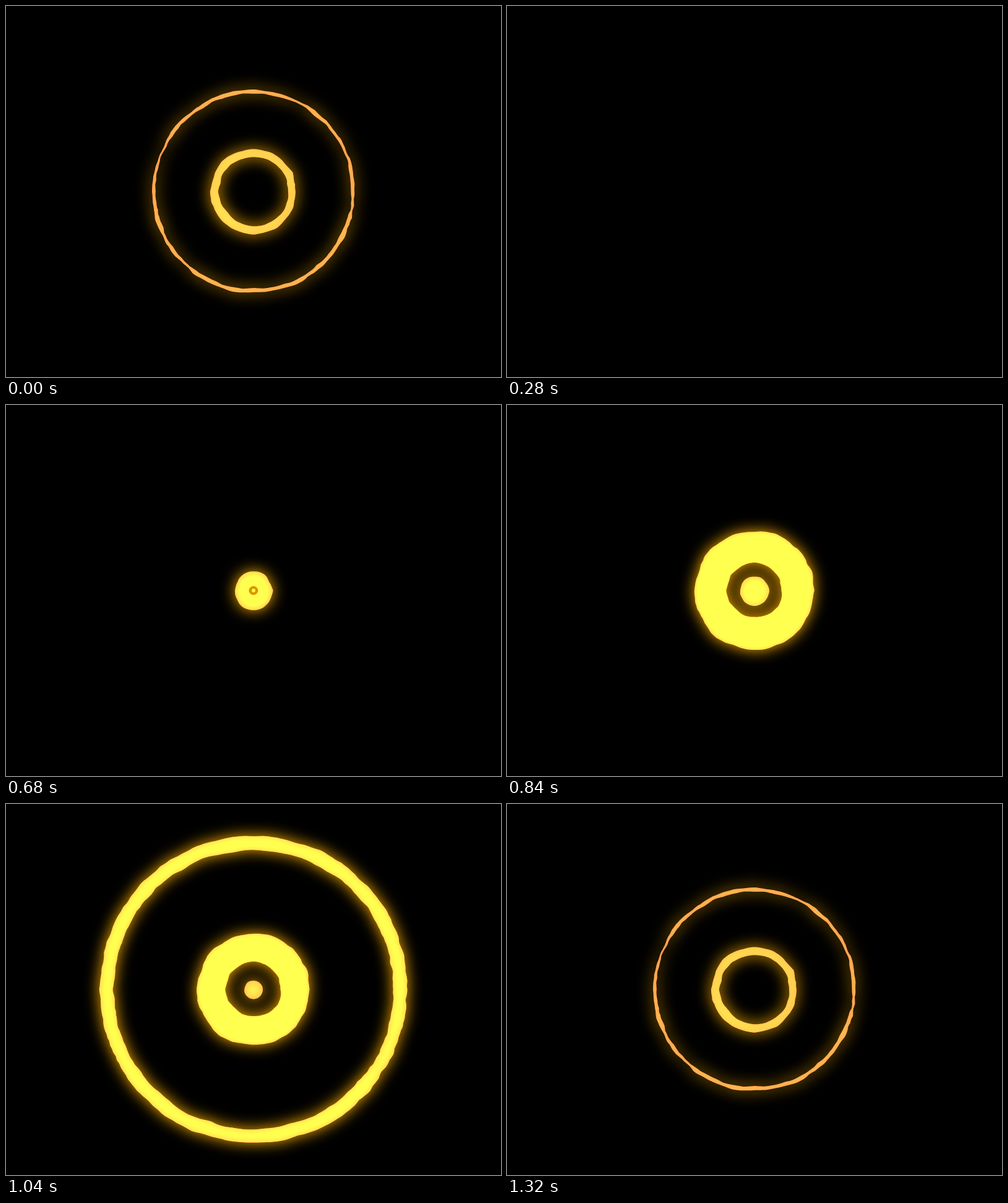
An HTML page for the animation above (1360 ms loop, 800 by 600 pixels).

```html
<!DOCTYPE html>
<html lang="en">
<head>
<meta charset="utf-8">
<title>Glowing rings</title>
<style>
  html, body { margin: 0; width: 100%; height: 100%; overflow: hidden; background: #000; }
  svg { display: block; width: 100vw; height: 100vh; background: #000; }
</style>
</head>
<body>
<svg viewBox="0 0 800 600">
  <defs>
    <filter id="glow" filterUnits="userSpaceOnUse" x="0" y="0" width="800" height="600" color-interpolation-filters="sRGB">
      <feGaussianBlur in="SourceAlpha" stdDeviation="12" result="blur"/>
      <feColorMatrix in="blur" values="0 0 0 0 1  0 0 0 0 .7  0 0 0 0 0  0 0 0 1 0" result="halo"/>
      <feComposite in="SourceGraphic" in2="halo" operator="arithmetic" k1="0" k2="1" k3="1" k4="0"/>
    </filter>
  </defs>
  <rect width="800" height="600" fill="#000"/>
  <g id="rings" filter="url(#glow)" fill="#ff8e50" fill-rule="evenodd"></g>
</svg>
<script>
const STEP = 40, LOOP = 1360, SPAN = 1320, FIRST = 520;
const CX = 400, CY = 300;

// Each ring grows to its own size; stroke scales the band width.
const rings = [
  { start: 520, size: 262, stroke: 1 },
  { start: 680, size: 164, stroke: 1 },
  { start: 840, size: 74, stroke: 0.46 }
];

// Time since start, share of full radius, band width
const keys = [
  [0, 0, 6], [160, 0.073, 24], [320, 0.268, 52], [360, 0.412, 46.5],
  [480, 0.845, 28], [520, 0.905, 22], [640, 0.982, 5.5], [720, 1, 1.8]
];
const LIFE = keys[keys.length - 1][0];

const group = document.getElementById('rings');
for (const ring of rings) {
  ring.path = document.createElementNS('http://www.w3.org/2000/svg', 'path');
  group.appendChild(ring.path);
}

const mix = (a, b, u) => a + (b - a) * u;

function slope(i) {
  const a = keys[Math.max(0, i - 1)], b = keys[Math.min(keys.length - 1, i + 1)];
  return (b[1] - a[1]) / (b[0] - a[0]);
}

function pose(t) {
  let i = 0;
  while (i < keys.length - 2 && t > keys[i + 1][0]) i++;
  const [t0, r0, w0] = keys[i], [t1, r1, w1] = keys[i + 1];
  const d = t1 - t0, u = (t - t0) / d, v = 1 - u;
  const share = v * v * (1 + 2 * u) * r0 + u * u * (3 - 2 * u) * r1 +
    d * u * v * (v * slope(i) - u * slope(i + 1));
  return { share, width: mix(w0, w1, u) };
}

function hash(x, y, seed) {
  const s = Math.sin(x * 127.1 + y * 311.7 + seed * 74.7) * 43758.5453;
  return (s - Math.floor(s)) * 2 - 1;
}

function noise(x, y, seed) {
  const ix = Math.floor(x), iy = Math.floor(y), u = x - ix, v = y - iy;
  return mix(
    mix(hash(ix, iy, seed), hash(ix + 1, iy, seed), u),
    mix(hash(ix, iy + 1, seed), hash(ix + 1, iy + 1, seed), u), v);
}

// The grain is fixed on the stage, longer across than down.
function rough(x, y, seed) {
  return 1.9 * noise(x / 36, y / 15, seed) + 1.1 * noise(x / 17, y / 6, seed + 5);
}

function ringPath(radius, width) {
  const outer = [], inner = [];
  const ro = radius + width / 2, ri = radius - width / 2;
  const count = Math.max(48, Math.round(ro * 1.6));
  for (let i = 0; i < count; i++) {
    const a = i / count * Math.PI * 2, c = Math.cos(a), s = Math.sin(a);
    const edge = (r, seed) =>
      r + rough(r * c, r * s, seed) * Math.min(1, Math.max(0, r) / 30);
    const out = edge(ro, 1);
    const hole = Math.max(0, Math.min(edge(ri, 2), out - 0.5));
    const point = r => (CX + r * c).toFixed(2) + ' ' + (CY + r * s).toFixed(2);
    outer.push(point(out));
    inner.push(point(hole));
  }
  const loop = list => 'M' + list.join('L') + 'Z';
  return loop(outer) + (ri > 1.5 ? loop(inner) : '');
}

function draw(ms) {
  let now = Math.floor((ms % LOOP) / STEP) * STEP % SPAN;
  if (now < FIRST) now += SPAN;
  for (const ring of rings) {
    const t = now - ring.start;
    let d = '';
    if (t >= 0 && t <= LIFE) {
      const p = pose(t);
      d = ringPath(ring.size * p.share, p.width * ring.stroke);
    }
    ring.path.setAttribute('d', d);
  }
}

const begin = performance.now();
function tick() {
  draw(performance.now() - begin);
  requestAnimationFrame(tick);
}
tick();
</script>
</body>
</html>
```
